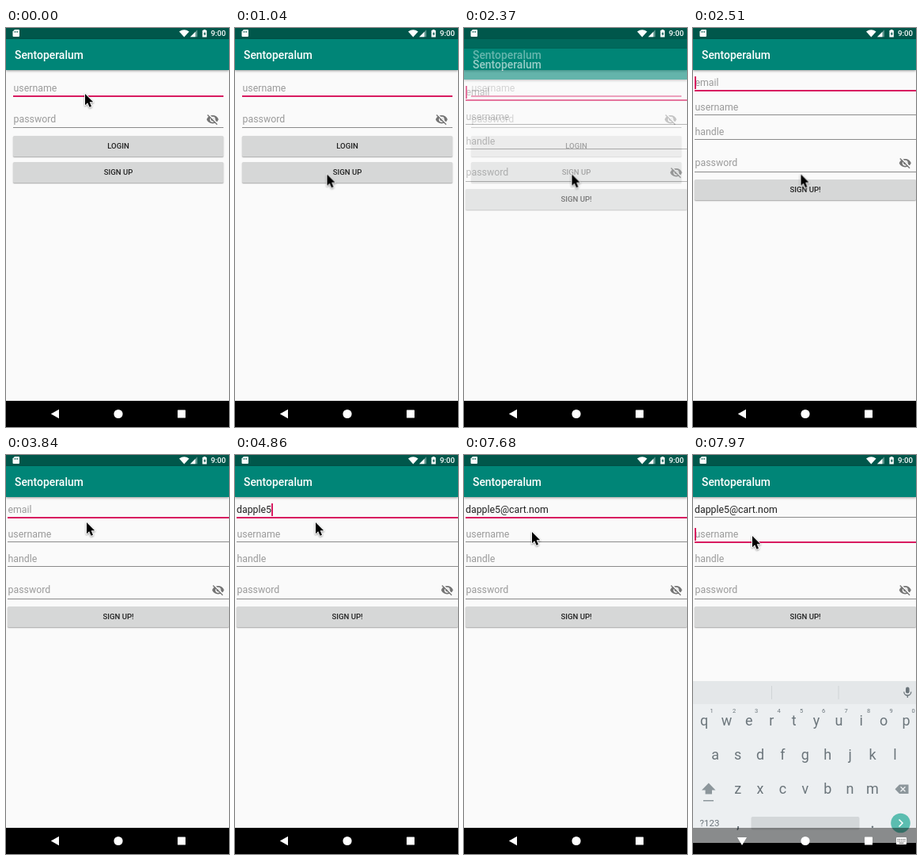
Write an HTML page that moves like this. It is 282x503 px and loops after 8000 ms.

```html
<!DOCTYPE html>
<html lang="en">
<head>
<meta charset="utf-8">
<title>Sign up flow</title>
<style>
:root { --pink: #d81b60; --line: #8b8b8b; }
html, body { margin: 0; width: 100%; height: 100%; overflow: hidden; background: #fafafa; }
#stage { position: relative; width: 282px; height: 503px; overflow: hidden; font: 12.35px Roboto, sans-serif; color: #212121; }
#stage > *, .screen > * { position: absolute; box-sizing: border-box; }

.screen { inset: 0 0 33px; background: #fafafa; }
.screen::before { content: ""; position: absolute; inset: 0 0 auto; height: 14px; background: #00574b; }
h1 { left: 0; top: 14px; width: 282px; height: 39px; margin: 0; padding-left: 11px; background: #008577; color: #fff;
  font: 500 13.9px/41px Roboto, sans-serif; box-shadow: 0 1px 3px #0006; }

.field { left: var(--x); right: var(--r); top: calc(var(--y) - 10px); height: 20px; display: flex; align-items: center; white-space: pre; }
.field::after { content: ""; position: absolute; left: 0; right: 0; top: calc(10px + var(--u, 9px)); height: 1px; background: var(--line); }
.field span { position: absolute; left: .5px; color: #9a9a9a; }
.field i { width: 1.5px; height: 16.5px; margin-right: -1.5px; background: var(--pink); opacity: 0; }
.field.on::after { height: 1.6px; background: var(--pink); }
.field svg { position: absolute; right: 6px; top: 2px; width: 16.5px; height: 16.5px; }
.button { left: var(--x); right: var(--r); top: var(--y); height: 26px; border-radius: 1.5px; background: #d6d7d7;
  box-shadow: 0 1px 1.5px #0005; font: 500 9.6px/26px Roboto, sans-serif; text-align: center; }

#login { --x: 9px; --r: 7px; }
#signup { --x: 2px; --r: 0px; }
#nav { left: 0; top: 470px; width: 282px; height: 33px; background: #000; }
.layer { left: 0; top: 0; width: 282px; height: 503px; }
#pointer { left: -2px; top: -2px; width: 18px; height: 24px; filter: drop-shadow(0 1px 1px #0006); }

/* Every track shares one 8 s loop and changes in hard steps. */
#signup, #pointer, #press, #user i, #email i, #email span, #email::before, #email::after, #name::after, #name i, #keys, .back, .down {
  animation: 8s step-end infinite; }
#signup { animation-name: open; }
#pointer { animation-name: move; }
#press { animation-name: press; }
#user i { animation-name: blink; }
#email i { animation-name: caret; }
#email span { animation-name: hint; }
#email::before { content: ""; animation-name: type; }
#email::after { animation-name: blur; }
#name::after { animation-name: focus; }
#name i { animation-name: focused; }
#keys, .down { animation-name: keys; }
.back { animation-name: back; }

@keyframes move {
  0%, 5.5% { transform: translate(100px, 83px); }
  7.37% { transform: translate(103px, 100px); }
  9.25% { transform: translate(109px, 140px); }
  11.12% { transform: translate(115px, 174px); }
  13% { transform: translate(116.5px, 184.5px); }
  18.5% { transform: translate(124px, 185px); }
  20.37% { transform: translate(136.5px, 184.5px); }
  35% { transform: translate(135px, 175px); }
  36.75% { transform: translate(122px, 138px); }
  38.6% { transform: translate(106px, 98px); }
  40.5% { transform: translate(102px, 85px); }
  96% { transform: translate(86px, 97px); }
  97.75%, to { transform: translate(75px, 102px); }
}
@keyframes blink {
  0%, 11.12%, 24% { opacity: 0; }
  5.5%, 18.5% { opacity: 1; }
}
@keyframes press {
  0%, 35% { background: #d6d7d7; }
  25.87% { background: #d0d2d1; }
  27.75% { background: #c8caca; }
}
@keyframes open {
  0% { opacity: 0; transform: none; }
  29.62% { opacity: .6; transform: translateY(12px); }
  31.35%, to { opacity: 1; transform: none; }
}
@keyframes caret {
  0%, 29.62%, 40.5%, 51.75%, 86.6% { opacity: 1; }
  36.75%, 48%, 84.85%, 94.1%, to { opacity: 0; }
}
@keyframes hint {
  0% { opacity: 1; }
  51.75%, to { opacity: 0; }
}
@keyframes type {
  0% { content: ""; }
  51.75% { content: "d"; }
  53.5% { content: "dap"; }
  55.37% { content: "dapp"; }
  57.12% { content: "dapple"; }
  60.72% { content: "dapple5"; }
  66.37% { content: "dapple5@"; }
  72% { content: "dapple5@c"; }
  73.87% { content: "dapple5@ca"; }
  75.62% { content: "dapple5@car"; }
  77.37% { content: "dapple5@cart."; }
  86.6% { content: "dapple5@cart.n"; }
  88.5%, to { content: "dapple5@cart.nom"; }
}
@keyframes blur {
  0% { height: 1.6px; background: var(--pink); }
  97.75%, to { height: 1px; background: var(--line); }
}
@keyframes focus {
  0% { height: 1px; background: var(--line); }
  97.75%, to { height: 1.6px; background: var(--pink); }
}
@keyframes focused {
  0% { opacity: 0; }
  97.75%, to { opacity: 1; }
}
@keyframes keys {
  0% { opacity: 0; }
  99.55%, to { opacity: 1; }
}
@keyframes back {
  0% { opacity: 1; }
  99.55%, to { opacity: 0; }
}
</style>
</head>
<body>
<div id="stage">
  <svg width="0" height="0">
    <symbol id="eye" viewBox="0 0 24 24">
      <path d="M1 12C4.5 2 19.5 2 23 12C19.5 22 4.5 22 1 12z" fill="#757575"/>
      <circle cx="12" cy="12" r="5" fill="#fafafa"/>
      <circle cx="12" cy="12" r="3" fill="#757575"/>
      <path d="M4 2.3L21.5 19.8" stroke="#fafafa" stroke-width="2.4"/>
      <path d="M2.6 3.6L20.4 21.4" stroke="#757575" stroke-width="1.9"/>
    </symbol>
  </svg>

  <div id="login" class="screen">
    <h1>Sentoperalum</h1>
    <div id="user" class="field on" style="--y:76px"><span>username</span><i></i></div>
    <div class="field" style="--y:115px;--u:10px"><span>password</span><svg><use href="#eye"/></svg></div>
    <div class="button" style="--y:135.5px">LOGIN</div>
    <div id="press" class="button" style="--y:168.5px">SIGN UP</div>
  </div>

  <div id="signup" class="screen">
    <h1>Sentoperalum</h1>
    <div id="email" class="field" style="--y:69px"><span>email</span><i></i></div>
    <div id="name" class="field" style="--y:100px"><span>username</span><i></i></div>
    <div class="field" style="--y:131px"><span>handle</span></div>
    <div class="field" style="--y:170px;--u:10.5px"><span>password</span><svg><use href="#eye"/></svg></div>
    <div class="button" style="--y:191px">SIGN UP!</div>
  </div>

  <svg class="layer" fill="#fff">
    <path d="M11 2h5a1 1 0 0 1 1 1v7a1 1 0 0 1-1 1H9.500a1 1 0 0 1-1-1V4.500z"/>
    <path d="M10.800 4v1.800M12.700 4v1.800M14.600 4v1.800" stroke="#00574b" stroke-width=".9"/>
    <path d="M219 4.500Q225.300-.2 231.600 4.500L225.300 11.500z"/>
    <path d="M233 11.300L242 2.300V11.300z" opacity=".35"/>
    <path d="M233 11.300L239.500 4.800V11.300z"/>
    <path d="M249.700 2h2.800v1h1.300v8.500h-5.400V3h1.300z"/>
    <path d="M251.700 4.500l-2 3.200h1.200v2.400l2-3.400h-1.200z" fill="#00574b"/>
    <text x="259" y="10.400" font-size="9.700" font-weight="500">9:00</text>
  </svg>

  <div id="nav"></div>

  <svg id="keys" class="layer" fill="#6b757b">
    <path d="M0 285H282V489H0z" fill="#eceff1"/>
    <path d="M0 285H282V314H0z" fill="#e4e7e9"/>
    <path d="M99.500 291V308M184 291V308" stroke="#d0d4d6"/>
    <rect x="269" y="292.500" width="4.600" height="8" rx="2.300"/>
    <path d="M266.800 298.500a4.500 4.500 0 0 0 9 0M271.300 303v3" fill="none" stroke="#6b757b" stroke-width="1.300"/>
    <g text-anchor="middle" font-size="18">
      <text y="341" x="14 42.400 70.800 99.200 127.600 156 184.400 212.800 241.200 269.600">qwertyuiop</text>
      <text y="384" x="28.200 56.600 85 113.400 141.800 170.200 198.600 227 255.400">asdfghjkl</text>
      <text y="427" x="56.600 85 113.400 141.800 170.200 198.600 227">zxcvbnm</text>
      <text y="325.300" x="23.500 52 80 108.500 137 165 193.500 222 250.500 278.500" font-size="7.500">1234567890</text>
      <text y="468" x="21" font-size="11.500">?123</text>
      <text y="470" x="57 227" font-size="18" font-weight="500">,.</text>
    </g>
    <g fill="#8c969b">
      <path d="M19.800 413.500L28.500 422.500H24V427.500H15.600V422.500H11z"/>
      <path d="M13 435H26V436.500H13z"/>
      <path d="M261 415.500H272.500V427H261L255.500 421.200z"/>
    </g>
    <path d="M262.500 418.200l6 6m0-6l-6 6" stroke="#eceff1" stroke-width="1.400"/>
    <rect x="73.500" y="456" width="137" height="16.500" rx="2" fill="#d3d7d9"/>
    <circle cx="262.500" cy="464" r="12.300" fill="#5bbdb0"/>
    <path d="M260.500 459.500l4.500 4.500-4.500 4.500" fill="none" stroke="#fff" stroke-width="1.500"/>
    <path d="M0 470H282V489H0z" fill="#000" opacity=".42"/>
  </svg>

  <svg class="layer" fill="#fff">
    <path class="back" d="M56.800 486.500L67 480.800V492.200z"/>
    <path class="down" d="M56 482H68L62 492z"/>
    <circle cx="142" cy="486.500" r="5.600"/>
    <rect x="217" y="481.500" width="10" height="10" rx=".6"/>
    <g class="down">
      <rect x="257" y="482" width="13" height="9" rx="1"/>
      <path d="M258.500 484.500H269M258.500 486.700H269" stroke="#555" stroke-dasharray="1.300 .9"/>
      <path d="M260.500 489.200H266.500" stroke="#555"/>
    </g>
  </svg>

  <svg id="pointer" viewBox="-2 -2 18 24">
    <path d="M0 0V14.200L3.200 11.200L5.600 16.700L8 15.700L5.700 10.300H10.200z" stroke="#fff" stroke-width="1.800" stroke-linejoin="round" paint-order="stroke"/>
  </svg>
</div>
</body>
</html>
```
